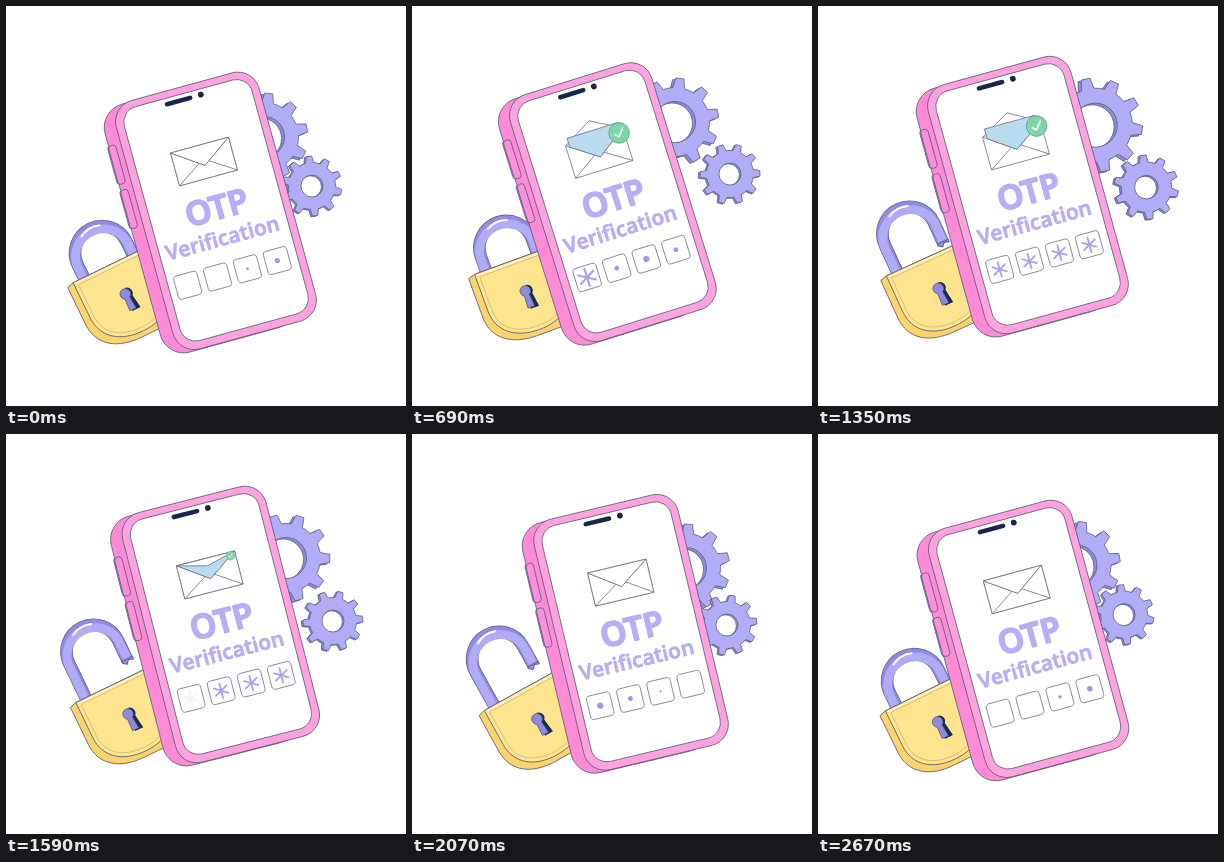
An HTML page for the animation above (2700 ms loop, 400 px wide and 400 px high).

```html
<!DOCTYPE html>
<html lang="en">
<head>
<meta charset="utf-8">
<title>OTP Verification</title>
<style>
  html, body { margin: 0; width: 100%; height: 100%; overflow: hidden; background: #fff; }
  svg { display: block; width: 100vw; height: 100vh; }
  .line { stroke: #59617f; stroke-width: .8; stroke-linejoin: round; }
  .thin { stroke: #6d7288; stroke-width: .75; stroke-linejoin: round; }
  .none { fill: none; }
  text { font-family: "Open Sans", "Noto Sans", sans-serif; font-weight: 600; text-anchor: middle;
         fill: #b4aff6; stroke: #b4aff6; stroke-linejoin: round; }
</style>
</head>
<body>
<svg viewBox="0 0 400 400">
  <g id="bigGear"></g>
  <g id="smallGear"></g>

  <g id="lock">
    <g id="shackle">
      <path class="none" d="M-30 14V-47A27 27 0 0 1 24 -47V-24" stroke="#59617f" stroke-width="12.6"/>
      <path class="none" d="M-30 14V-47A27 27 0 0 1 24 -47V-24.7" stroke="#908ae2" stroke-width="11.2"/>
      <path class="none" d="M-31 14V-47A28 28 0 0 1 24.4 -47V-27" stroke="#b0abf6" stroke-width="8.8"/>
      <path class="none" d="M-14 -71Q-4 -77 7 -73" stroke="#fff" stroke-width="2" stroke-linecap="round"/>
      <path class="line" d="M18 -24L22 -21L25 -25L30 -23V-26H18Z" fill="#908ae2"/>
    </g>
    <path class="line" d="M-49 -31V10C-49 34 -30 46 -4 46H20Q40 44 40 20V-33H-42Z" fill="#ffd36b"/>
    <path class="line" d="M-42 -33V6C-42 28 -25 41 0 41S42 28 42 6V-33Z" fill="#ffe48f"/>
    <path class="none" d="M-38 -29V6C-38 26 -22 37 0 37S38 26 38 6V-29Z" stroke="#cdb377" stroke-width=".7"/>
    <path class="none" d="M-40 -31H40" stroke="#fff3c6" stroke-width="1.5"/>
    <path d="M3 -5.5A5.8 5.8 0 0 1 6 4.2L8 18.5H-1L0 -4Z" fill="#1d2a4d"/>
    <path class="line" d="M-2.6 4.6A5.3 5.3 0 1 1 2.6 4.6L3.6 17H-3.2Z" fill="#8f89e2"/>
  </g>

  <g id="phone">
    <rect class="line" x="-87.5" y="-155" width="10" height="40" rx="3.5" fill="#ff8fd8"/>
    <rect class="line" x="-87.5" y="-109" width="10" height="40" rx="3.5" fill="#ff8fd8"/>
    <rect class="line" x="-86" y="-192" width="140" height="257" rx="24" fill="#ff8bd6"/>
    <rect class="line" x="-86.5" y="-155" width="7.5" height="40" rx="3" fill="#ff8fd8"/>
    <rect class="line" x="-86.5" y="-109" width="7.5" height="40" rx="3" fill="#ff8fd8"/>
    <rect class="line" x="-73.5" y="-193" width="148" height="257.5" rx="22" fill="#ffa2de"/>
    <rect class="line" x="-65.5" y="-186" width="132.5" height="242.5" rx="16" fill="#fff"/>
    <path d="M-18.5 -180H5.5" stroke="#17264a" stroke-width="4.6" stroke-linecap="round"/>
    <circle cx="16.7" cy="-180.3" r="2.9" fill="#17264a"/>

    <g class="thin" fill="#fff">
      <path id="flapUp"/>
      <rect x="-28" y="-132" width="60" height="34" id="back"/>
      <path id="letter" fill="#b9dcf0"/>
      <path d="M-28 -132L2 -111L32 -132V-98H-28Z"/>
      <path class="none" d="M-28 -98L-3 -114.5M32 -98L7 -114.5"/>
      <path id="flapDown"/>
    </g>
    <g id="badge">
      <circle r="10.3" fill="#7fd6a8" stroke="#5aa98a" stroke-width=".8"/>
      <path class="none" d="M-4.5 .3L-1.2 3.8L4.8 -3.6" stroke="#fff" stroke-width="1.5" stroke-linecap="round" stroke-linejoin="round"/>
    </g>

    <text x="2" y="-55.5" font-size="33" stroke-width="2">OTP</text>
    <text x="-.4" y="-28.8" font-size="20.8" letter-spacing=".2" stroke-width=".9">Verification</text>
    <g id="boxes"></g>
  </g>
</svg>
<script>
const LOOP = 2700, STEP = 30, NS = "http://www.w3.org/2000/svg";
const $ = id => document.getElementById(id);
const clamp = v => Math.max(0, Math.min(1, v));
const ramp = (t, from, len) => clamp((t - from) / len);
const ease = v => v * v * (3 - 2 * v);
const attr = (el, set) => { for (const k in set) el.setAttribute(k, set[k]); return el; };
const add = (parent, tag, set) => parent.appendChild(attr(document.createElementNS(NS, tag), set));
const place = (id, x, y, a = 0, s = 1) =>
  attr($(id), { transform: `translate(${x} ${y}) rotate(${a}) scale(${s})` });

// Smooth periodic curve through values at the shared key times
const KEYS = [0, 450, 690, 1080, 1590, 2070];
function curve(vals) {
  const n = KEYS.length;
  const time = i => KEYS[(i + n) % n] + LOOP * Math.floor(i / n);
  const val = i => vals[(i + n) % n];
  const slope = i => (val(i + 1) - val(i - 1)) / (time(i + 1) - time(i - 1));
  return t => {
    let i = n - 1;
    while (KEYS[i] > t) i--;
    const h = time(i + 1) - time(i), p = (t - time(i)) / h, q = 1 - p;
    return val(i) * (1 + 2 * p) * q * q + slope(i) * h * p * q * q
      + val(i + 1) * p * p * (3 - 2 * p) - slope(i + 1) * h * p * p * q;
  };
}

const bigX = curve([258, 258, 263, 272, 280, 274]);
const bigY = curve([131, 120, 116, 115, 124, 134]);
const smallX = curve([306, 312, 318, 327, 327, 315]);
const smallY = curve([180, 169, 168, 174, 187, 191]);
const lockX = curve([119.3, 115, 113.3, 118, 122, 125]);
const lockY = curve([288, 287, 285, 286, 280, 285]);
const lockA = curve([-26, -21.7, -20, -23, -25.8, -29]);

function gearPath(teeth, tip, root, hole, turn) {
  const pitch = 360 / teeth;
  const pt = (r, deg) => {
    const a = deg * Math.PI / 180;
    return (r * Math.cos(a)).toFixed(2) + " " + (r * Math.sin(a)).toFixed(2);
  };
  let d = "";
  for (let i = 0; i < teeth; i++) {
    const a = turn + i * pitch;
    d += (i ? "L" : "M") + pt(root, a - pitch * .27) + "L" + pt(tip, a - pitch * .15)
      + "L" + pt(tip, a + pitch * .15) + "L" + pt(root, a + pitch * .27)
      + `A${root} ${root} 0 0 1 ` + pt(root, a + pitch * .73);
  }
  return d + `ZM${hole} 0A${hole} ${hole} 0 1 0 ${-hole} 0A${hole} ${hole} 0 1 0 ${hole} 0Z`;
}

function makeGear(id, teeth, tip, root, hole, depth) {
  const look = { class: "line", "fill-rule": "evenodd" };
  const side = add($(id), "path", { ...look, fill: "#8f89dc", transform: `translate(${-depth} ${depth * .5})` });
  const face = add($(id), "path", { ...look, fill: "#b1acf6" });
  return (x, y, turn, size) => {
    const d = gearPath(teeth, tip, root, hole, turn);
    attr(side, { d });
    attr(face, { d });
    place(id, x, y, 0, size);
  };
}
const bigGear = makeGear("bigGear", 10, 44, 34.5, 20.5, 3);
const smallGear = makeGear("smallGear", 10, 30, 23.5, 11, 1.6);

const boxes = [0, 1, 2, 3].map(i => {
  const g = add($("boxes"), "g", { transform: `translate(${(i - 1.5) * 31} 0)` });
  add(g, "rect", { x: -12, y: -12, width: 24, height: 24, rx: 3.5, class: "thin", fill: "#fff" });
  return {
    dot: add(g, "circle", { fill: "#9f98ee" }),
    star: add(g, "path", {
      d: "M0 -7.2V7.2M-6.2 -3.6L6.2 3.6M-6.2 3.6L6.2 -3.6",
      stroke: "#a6a0f1", "stroke-width": 1.7, "stroke-linecap": "round"
    })
  };
});

function drawBox({ dot, star }, i, t) {
  const start = 120 + 105 * i, pop = start + 470;
  const grow = ramp(t, start, 330) * (1 - ramp(t, pop - 20, 60));
  const off = (t - (2100 + 150 * i) + LOOP * 1.5) % LOOP - LOOP / 2;
  const pulse = Math.abs(off) < 430 ? Math.cos(off / 430 * Math.PI / 2) : 0;
  attr(dot, { r: 3.1 * Math.max(grow, pulse) });
  const size = 1.25 * ease(ramp(t, pop, 100)) - .2 * ease(ramp(t, pop + 150, 150));
  attr(star, { transform: `scale(${size})`, opacity: 1 - ramp(t, 1470 + 150 * i, 140) });
}

function drawMail(t) {
  const open = ease(ramp(t, 130, 340)) * (1 - ease(ramp(t, 1380, 350)));
  const tip = -111 - 38 * open;
  const flap = `M-28 -132L2 ${tip}L32 -132Z`;
  const up = tip < -132;
  attr($("flapUp"), { d: up ? flap : "" });
  attr($("back"), { stroke: up ? "none" : "#6d7288" });
  attr($("flapDown"), { d: up ? "" : flap });
  const rise = ease(ramp(t, 400, 500)) * (1 - ease(ramp(t, 1250, 260)));
  const top = -132 - 11 * rise, inset = 6 * rise;
  attr($("letter"), {
    d: `M${-28 + inset} ${top}H${32 - inset}V${-132 + inset * .7}L2 -111L${-28 + inset} ${-132 + inset * .7}Z`,
    visibility: open > .01 ? "visible" : "hidden"
  });
  place("badge", 27, -128.5, 0, ease(ramp(t, 260, 340)) * (1 - ease(ramp(t, 1410, 330))));
}

function draw(t) {
  const p = t / LOOP, w = p * 2 * Math.PI, s = Math.sin(w);
  place("phone", 226.5 - 7 * s, 259 + 8 * Math.cos(w + .14), -15.35 - 1.95 * s);

  const beat = ramp(t, 670, 870);
  const size = 1 + .18 * Math.sin(beat * Math.PI) ** 2;
  bigGear(bigX(t), bigY(t), 24 - 108 * p - 8 * s, size);
  smallGear(smallX(t), smallY(t), 12 + 144 * p - 14 * s, size);

  place("lock", lockX(t), lockY(t), lockA(t));
  const lift = ease(ramp(t, 1200, 260)) * (1 - ease(ramp(t, 2280, 260)));
  place("shackle", -lift, -24 * lift);

  drawMail(t);
  boxes.forEach((b, i) => drawBox(b, i, t));
}

const begin = performance.now();
function tick() {
  const t = (performance.now() - begin) % LOOP;
  draw(Math.floor(t / STEP) * STEP);
  requestAnimationFrame(tick);
}
tick();
</script>
</body>
</html>
```
